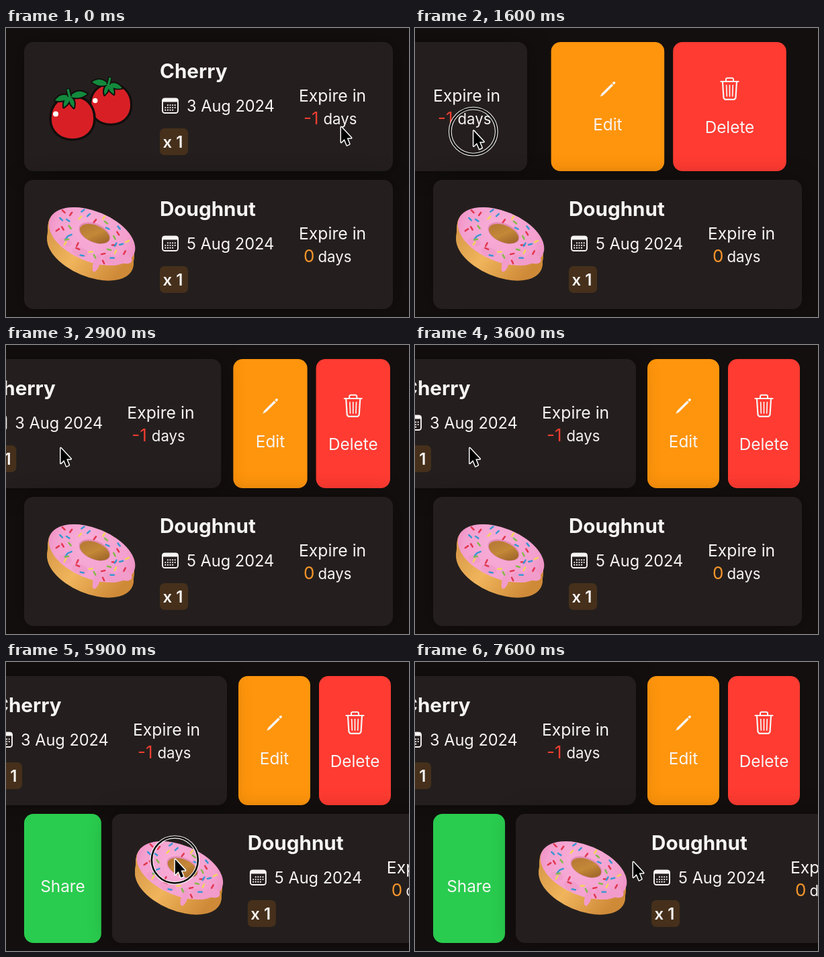
An HTML page with a canvas for the animation above (7700 ms loop, 600 by 432 pixels).

```html
<!DOCTYPE html>
<html lang="en">
<head>
<meta charset="utf-8">
<title>Swipe actions</title>
<style>
html, body { margin: 0; width: 100%; height: 100%; overflow: hidden; background: #130f0e; }
canvas { display: block; width: 600px; height: 432px; }
</style>
</head>
<body>
<canvas id="stage" width="600" height="432"></canvas>
<script>
const ctx = document.getElementById('stage').getContext('2d');
const LOOP = 7700, STEP = 100;
const WHITE = '#f7f5f4', RED = '#ff3b32', ORANGE = '#ff950c', GREEN = '#29cc4e';
const CARD = { x: 27, y: 21, w: 549, h: 193 }, ROW = 206;
const ACTION_W = 107, OPEN_LEFT = 247, OPEN_RIGHT = 123;

const clamp = (v, a = 0, b = 1) => Math.min(b, Math.max(a, v));
const lerp = (a, b, p) => a + (b - a) * p;
const ease = p => p < 0.5 ? 2 * p * p : 1 - 2 * (1 - p) * (1 - p);
const span = (t, from, to) => ease(clamp((t - from) / (to - from)));
const settle = ms => {
  const k = Math.max(0, ms) * 0.0157;
  return Math.exp(-k) * (1 + k);
};

function roundBox(x, y, w, h, r, fill) {
  ctx.beginPath();
  ctx.roundRect(x, y, w, h, r);
  ctx.fillStyle = fill;
  ctx.fill();
}

function text(str, x, y, size, color = WHITE, weight = 400, align = 'left') {
  ctx.font = `${weight} ${size}px Inter, "Open Sans", sans-serif`;
  ctx.textAlign = align;
  ctx.fillStyle = color;
  ctx.fillText(str, x, y);
}

function line(points, width, color = WHITE) {
  ctx.beginPath();
  points.forEach(([x, y], i) => i ? ctx.lineTo(x, y) : ctx.moveTo(x, y));
  ctx.lineWidth = width;
  ctx.strokeStyle = color;
  ctx.stroke();
}

function ellipse(x, y, rx, ry, turn, fill) {
  ctx.beginPath();
  ctx.ellipse(x, y, rx, ry, turn, 0, Math.PI * 2);
  ctx.fillStyle = fill;
  ctx.fill();
}

function calendar() {
  ctx.beginPath();
  ctx.roundRect(233, 105.5, 23, 21.5, 3.5);
  ctx.lineWidth = 1.9;
  ctx.strokeStyle = WHITE;
  ctx.stroke();
  roundBox(232.5, 105, 24, 5.5, [3, 3, 0, 0], WHITE);
  for (let r = 0; r < 3; r++) {
    for (let c = 0; c < 5; c++) {
      if ((r === 0 && c < 1) || (r === 2 && c > 3)) continue;
      ellipse(237.3 + c * 3.6, 115.3 + r * 3.7, 1.1, 1.1, 0, WHITE);
    }
  }
}

function tomato(x, y, size, flip) {
  ctx.save();
  ctx.translate(x, y);
  ctx.scale(size, size);
  ctx.lineJoin = 'round';

  ctx.beginPath();
  ctx.moveTo(0, -31);
  ctx.bezierCurveTo(17, -38, 33, -22, 33, -1);
  ctx.bezierCurveTo(33, 19, 18, 30.5, 0, 30.5);
  ctx.bezierCurveTo(-18, 30.5, -33, 19, -33, -1);
  ctx.bezierCurveTo(-33, -22, -17, -38, 0, -31);
  ctx.fillStyle = '#d91f26';
  ctx.fill();
  ctx.lineWidth = 3.6;
  ctx.strokeStyle = '#120e0d';
  ctx.stroke();
  ellipse(-25, -8, 4, 4, 0, '#fff');

  ctx.translate(-4, -34);
  ctx.scale(flip, 1);
  ctx.beginPath();
  for (const [tx, ty] of [[-22, 6], [-9, 16], [6, 17], [26, -4]]) {
    const nx = -ty * 0.36, ny = tx * 0.36;
    ctx.moveTo(0, 0);
    ctx.quadraticCurveTo(tx / 2 + nx, ty / 2 + ny - 2, tx, ty);
    ctx.quadraticCurveTo(tx / 2 - nx, ty / 2 - ny - 2, 0, 0);
  }
  ctx.lineWidth = 4;
  ctx.stroke();
  ctx.fillStyle = '#138a3d';
  ctx.fill();
  line([[0, 0], [-3, -12]], 6.5, '#120e0d');
  line([[0, 1], [-3, -11]], 3.4, '#138a3d');
  ctx.restore();
}

function cherry() {
  tomato(156, 116, 0.93, -1);
  tomato(99, 136.5, 1, 1);
}

function doughnut() {
  const turn = 0.4;
  const dough = ctx.createLinearGradient(66, 300, 160, 376);
  dough.addColorStop(0, '#d99a48');
  dough.addColorStop(0.45, '#f0b55c');
  dough.addColorStop(1, '#cf8a38');
  for (let i = 0; i <= 16; i++) {
    ellipse(lerp(127, 125.5, i / 16), lerp(313, 334.5, i / 16), 68, 37, turn, dough);
  }

  const icing = ctx.createRadialGradient(122, 296, 10, 128, 311, 72);
  icing.addColorStop(0, '#f7acd6');
  icing.addColorStop(0.7, '#f4a0cf');
  icing.addColorStop(1, '#ec8fc2');
  ellipse(128, 311.5, 68, 37.5, turn, icing);
  for (const [x, y, rx, ry] of [[88, 320, 10, 6], [110, 335, 12, 7],
    [135, 351, 5, 14], [157, 347, 13, 7], [177, 345, 11, 7]]) {
    ellipse(x, y, rx, ry, 0.3, '#f19cca');
  }

  ellipse(132, 306.5, 25, 14, turn, '#e58dbb');
  const hole = ctx.createLinearGradient(126, 294, 138, 322);
  hole.addColorStop(0, '#b97c36');
  hole.addColorStop(0.5, '#c48838');
  hole.addColorStop(1, '#a56c2c');
  ellipse(132, 307.5, 23.5, 12.5, turn, hole);

  const colors = ['#e2364e', '#3a97d4', '#f3d558', '#e2364e', '#3a97d4', '#86b94b'];
  ctx.lineCap = 'round';
  for (let i = 0; i < 36; i++) {
    const a = i * 2.4, r = 0.52 + 0.42 * ((i * 0.414) % 1);
    const u = Math.cos(a) * 67 * r, v = Math.sin(a) * 37 * r;
    const x = 128.5 + u * Math.cos(turn) - v * Math.sin(turn);
    const y = 311 + u * Math.sin(turn) + v * Math.cos(turn);
    const lean = Math.sin(i * 5.3) * 1.1;
    const dx = Math.cos(lean) * 2.6, dy = Math.sin(lean) * 2.6;
    line([[x - dx, y - dy], [x + dx, y + dy]], 2.5, colors[i % colors.length]);
  }
  ctx.lineCap = 'butt';
}

function card(dx, row, item) {
  ctx.save();
  ctx.translate(dx, row * ROW);
  ctx.shadowColor = 'rgba(0, 0, 0, 0.33)';
  ctx.shadowBlur = 36;
  roundBox(CARD.x, CARD.y, CARD.w, CARD.h, 14, '#241f1e');
  ctx.shadowColor = 'transparent';
  text(item.name, 229, 75, 29.6, WHITE, 700);
  calendar();
  text(item.date, 269, 125, 23.55);
  roundBox(229, 150, 42, 40, 7, '#46301b');
  text('x 1', 233.5, 179, 24, WHITE, 600);
  text('Expire in', 436, 110, 24.7);
  text(item.days, 443, 144, 26, item.color);
  text('days', item.unitX, 144, 22.2);
  ctx.translate(0, -row * ROW);
  item.draw();
  ctx.restore();
}

function pencil(cx) {
  ctx.save();
  ctx.translate(cx, 91.5);
  ctx.rotate(-Math.PI / 4);
  ctx.fillStyle = WHITE;
  ctx.beginPath();
  ctx.moveTo(-16, 0);
  ctx.lineTo(-11, -1.8);
  ctx.lineTo(10, -1.8);
  ctx.lineTo(10, 1.8);
  ctx.lineTo(-11, 1.8);
  ctx.fill();
  roundBox(11.2, -1.8, 4.2, 3.6, [0, 1.8, 1.8, 0], WHITE);
  ctx.restore();
}

function trash(cx) {
  ctx.save();
  ctx.translate(cx, 0);
  ctx.lineCap = ctx.lineJoin = 'round';
  line([[-13, 80], [13, 80]], 2.2);
  line([[-5.5, 79], [-5.5, 76], [-4, 74.7], [4, 74.7], [5.5, 76], [5.5, 79]], 2);
  line([[-10.5, 81], [-9, 104.5], [-7, 106.8], [7, 106.8], [9, 104.5], [10.5, 81]], 2.2);
  line([[-4.8, 85.5], [-4.2, 102]], 1.7);
  line([[0, 85.5], [0, 102]], 1.7);
  line([[4.8, 85.5], [4.2, 102]], 1.7);
  ctx.restore();
}

const fade = d => clamp((Math.abs(d) - 54) / 53);

// Actions trail at half speed until open, then stretch.
function trailingActions(dx) {
  const extra = Math.max(0, -dx - OPEN_LEFT);
  const shift = Math.max(0, OPEN_LEFT + dx) / 2;
  const w = ACTION_W + extra * 0.38;
  const del = 573 + shift - extra / 8 - w;
  const edit = del - 13 - w;
  ctx.globalAlpha = fade(dx);
  roundBox(edit, CARD.y, w, CARD.h, 14, ORANGE);
  pencil(edit + w / 2);
  text('Edit', edit + w / 2, 153, 24.3, WHITE, 400, 'center');
  roundBox(del, CARD.y, w, CARD.h, 14, RED);
  trash(del + w / 2);
  text('Delete', del + w / 2, 157, 24.3, WHITE, 400, 'center');
  ctx.globalAlpha = 1;
}

function leadingAction(dx) {
  const x = CARD.x - Math.max(0, OPEN_RIGHT - dx) / 2;
  const w = ACTION_W + Math.max(0, dx - OPEN_RIGHT);
  ctx.globalAlpha = fade(dx);
  roundBox(x, CARD.y + ROW, w, CARD.h, 14, GREEN);
  text('Share', x + w / 2, 344, 24.3, WHITE, 400, 'center');
  ctx.globalAlpha = 1;
}

function ring(x, y) {
  for (const [width, color] of [[4.8, WHITE], [2.6, '#0b0909']]) {
    ctx.beginPath();
    ctx.arc(x - 0.5, y + 1, 34.5, 0, Math.PI * 2);
    ctx.lineWidth = width;
    ctx.strokeStyle = color;
    ctx.stroke();
  }
}

function pointer(x, y) {
  ctx.save();
  ctx.translate(x, y);
  ctx.scale(0.9, 0.95);
  ctx.beginPath();
  for (const [px, py] of [[0, 0], [0, 24], [5.4, 19], [9.6, 28.6], [13.6, 26.8], [9.6, 17.4], [16.8, 17.2]]) {
    ctx.lineTo(px, py);
  }
  ctx.closePath();
  ctx.lineJoin = 'round';
  ctx.lineWidth = 3.2;
  ctx.strokeStyle = '#fff';
  ctx.stroke();
  ctx.fillStyle = '#000';
  ctx.fill();
  ctx.restore();
}

const drag1 = { from: 500, to: 1700, release: 2600 };
const drag2 = { from: 5580, to: 6135, release: 6950 };
const held = (t, d) => t >= d.from && t < d.release;

function cursorAt(t) {
  if (t < 3900) {
    const y = t < 1000 ? lerp(148, 145, span(t, 500, 1000)) : lerp(145, 154, span(t, 1000, 1700));
    return [lerp(499, 81.5, span(t, drag1.from, drag1.to)), y];
  }
  if (t < drag2.from) {
    const p = span(t, 3900, 4900);
    return [lerp(81.5, 121, p), lerp(154, 288, p)];
  }
  const p = span(t, drag2.from, drag2.to);
  return [lerp(121, 325, p), lerp(288, 299, p)];
}

function offsets(t) {
  const first = t < drag1.release
    ? -416 * span(t - 10, drag1.from, drag1.to)
    : -OPEN_LEFT - (416 - OPEN_LEFT) * settle(t - drag1.release);
  const second = t < drag2.release
    ? 204 * span(t, drag2.from, drag2.to)
    : OPEN_RIGHT + (204 - OPEN_RIGHT) * settle(t - drag2.release);
  return [first, second];
}

const items = [
  { name: 'Cherry', date: '3 Aug 2024', days: '-1', color: '#ee3d30', unitX: 472.5, draw: cherry },
  { name: 'Doughnut', date: '5 Aug 2024', days: '0', color: '#f5942a', unitX: 464.5, draw: doughnut }
];

function render(t) {
  ctx.fillStyle = '#130f0e';
  ctx.fillRect(0, 0, 600, 432);
  const [first, second] = offsets(t);
  trailingActions(first);
  card(first, 0, items[0]);
  leadingAction(second);
  card(second, 1, items[1]);
  const [x, y] = cursorAt(t);
  if (held(t, drag1) || held(t, drag2)) ring(x, y);
  pointer(x, y);
}

const start = performance.now();
function tick() {
  const t = (performance.now() - start) % LOOP;
  render(Math.floor(t / STEP) * STEP);
  requestAnimationFrame(tick);
}
tick();
</script>
</body>
</html>
```
